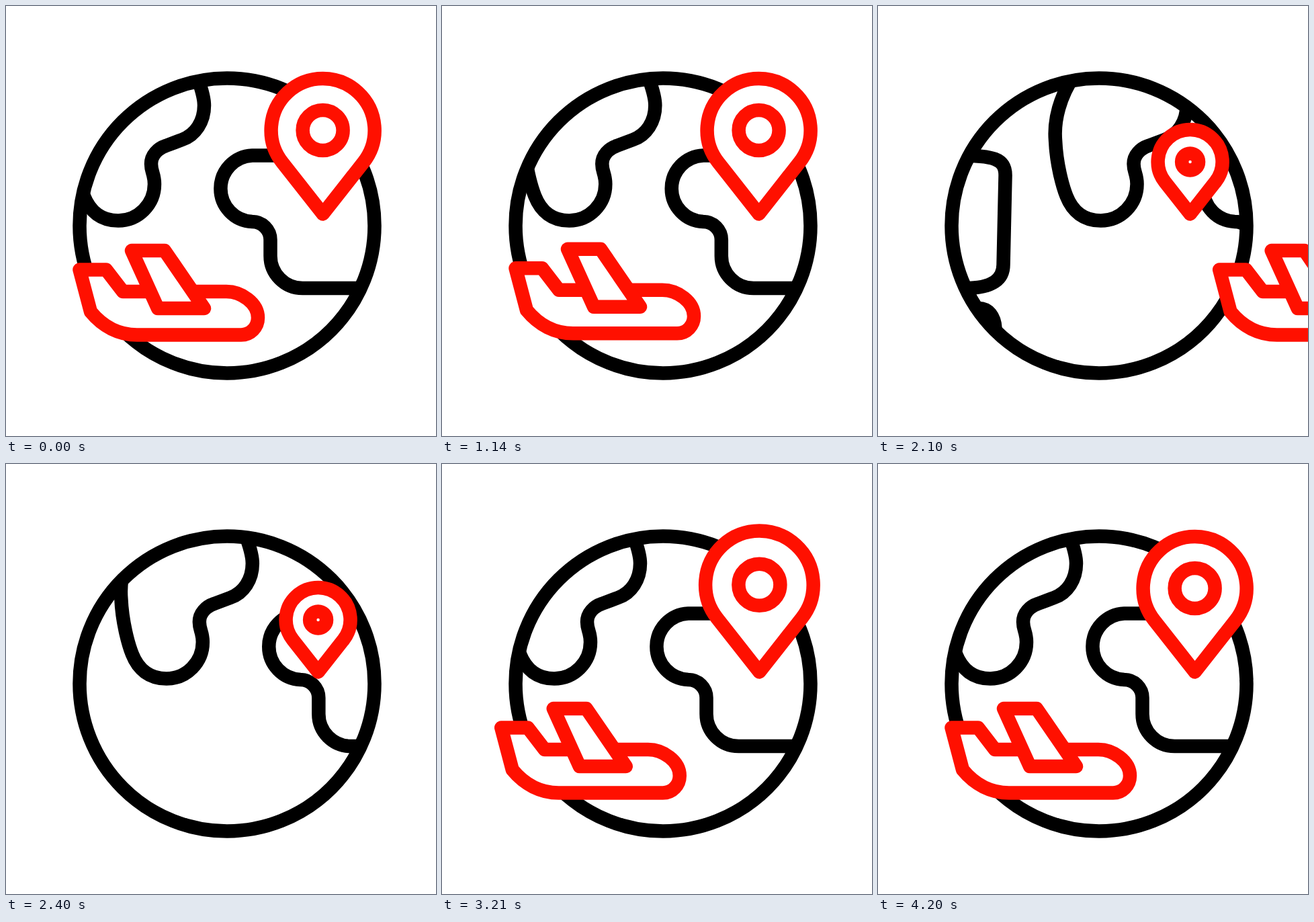
Write an HTML page that moves like this. It is 640 px wide and 640 px high and loops after 4230 ms.

```html
<!DOCTYPE html>
<html lang="en">
<head>
<meta charset="utf-8">
<title>Globe, plane and pin</title>
<style>
  html, body { margin: 0; width: 100%; height: 100%; overflow: hidden; background: #fff; }
  svg { display: block; width: 100vw; height: 100vh; }
  .line { stroke-width: 20.5; stroke-linecap: round; stroke-linejoin: round; }
  .dark { stroke: #000; }
  .red { stroke: #ff1000; }
</style>
</head>
<body>
<svg viewBox="0 0 640 640">
  <defs>
    <clipPath id="disc"><circle cx="329" cy="327" r="222"/></clipPath>
    <g id="land">
      <path d="M128 102C106 135 97 170 99.500 200C101 235 110 268 116 283C125 306 142 319.500 167 319.500C197 319.500 221 295 221 265C221 250 216 247 216 235C216 222 226 212 238 208L262 199C282 192 295 172 295 148C295 135 290 120 284 104Z"/>
      <path d="M560 222.500H366.500A49.300 49.300 0 0 0 366.500 321A27 27 0 0 1 393.500 348V372A48 48 0 0 0 441.500 420H570C612 420 627 406 627 385L630 252C630 227 612 222.500 560 222.500Z"/>
      <path d="M529 487C529 505 537 515 549 515C570 515 587 512 597 510C610 507 615 497 615 480C614 462 605 450 590 450H560C540 450 529 465 529 487Z"/>
    </g>
  </defs>
  <rect width="640" height="640" fill="#fff"/>
  <g class="line dark" fill="none">
    <g clip-path="url(#disc)">
      <use id="landA" href="#land"/>
      <use id="landB" href="#land"/>
    </g>
    <circle cx="329" cy="327" r="219.500"/>
  </g>
  <g id="plane" class="line red" fill="#fff">
    <path d="M109.500 392.500H149L174 425H328C350 425 375 442 375 464C375 478 364 489.500 350 489.500H195C168 489.500 144 477 126 455Z"/>
    <path d="M187 364H236L295 450H226Z"/>
  </g>
  <g class="line red" fill="#fff">
    <path id="pin"/>
    <circle id="eye"/>
  </g>
  <g id="streaks"></g>
</svg>
<script>
const LOOP = 4230, TURN = 605;
const $ = id => document.getElementById(id);
const clamp = v => Math.min(1, Math.max(0, v));

// Cubic easing with end slopes of zero; a and b are the handles' x values.
const ease = (a, b) => x => {
  let lo = 0, hi = 1;
  for (let i = 0; i < 24; i++) {
    const s = (lo + hi) / 2, r = 1 - s;
    if (3 * r * r * s * a + 3 * r * s * s * b + s * s * s < x) lo = s; else hi = s;
  }
  return lo * lo * (3 - 2 * lo);
};
const smooth = x => x * x * (3 - 2 * x);
const spin = ease(0.33, 0.25);
const arrive = ease(0.33, 0.04);

// Keys are [time, value, easing used to reach it].
function track(keys, t) {
  let value = keys[0][1];
  for (let i = 1; i < keys.length; i++) {
    const [t0, v0] = keys[i - 1], [t1, v1, curve = smooth] = keys[i];
    if (t < t0) break;
    value = v0 + (v1 - v0) * curve(clamp((t - t0) / (t1 - t0)));
  }
  return value;
}

const landX = [[650, 0], [1120, 22.5], [3170, -TURN, spin]];
const planeExit = [[1150, 0], [1450, -20.5], [2450, 562]];
const planeEntry = [[2610, -561], [3455, 0, arrive]];
const planeY = [[0, 0], [700, -6], [1450, 0]];
const pinScale = [[1150, 1], [1620, 1.062], [2080, 0.623], [2810, 0.623], [3270, 1.062], [3750, 1]];

const streaks = [
  { x: 77, y: 510.5, length: 52, color: "dark" },
  { x: 254, y: 386.5, length: 38, color: "dark" },
  { x: 322, y: 510.5, length: 22, color: "red" }
].map(s => {
  const node = document.createElementNS("http://www.w3.org/2000/svg", "path");
  node.setAttribute("class", "line " + s.color);
  $("streaks").append(node);
  return { ...s, node };
});

function drawPin(s) {
  const x = 453 + 18.6 * s, tip = 309.5, r = 77 * s, cy = tip - 124.5 * s;
  const dx = 60.5 * s, y = cy + 47.6 * s;
  $("pin").setAttribute("d", `M${x} ${tip}L${x - dx} ${y}A${r} ${r} 0 1 1 ${x + dx} ${y}Z`);
  $("eye").setAttribute("cx", x);
  $("eye").setAttribute("cy", cy);
  $("eye").setAttribute("r", 30 + (s - 1) * (s > 1 ? 24 : 46.5));
}

function drawStreaks(t) {
  const head = smooth(clamp((t - 1650) / 200));
  const tail = smooth(clamp((t - 1700) / 200));
  for (const { x, y, length, node } of streaks) {
    node.setAttribute("d", `M${x - length * tail} ${y}H${x - length * head}`);
    node.style.display = head > tail ? "" : "none";
  }
}

function draw(t) {
  const shift = track(landX, t);
  $("landA").setAttribute("x", shift);
  $("landB").setAttribute("x", shift + TURN);
  const planeX = track(t < 2610 ? planeExit : planeEntry, t);
  $("plane").setAttribute("transform", `translate(${planeX} ${track(planeY, t)})`);
  drawPin(track(pinScale, t));
  drawStreaks(t);
}

const start = performance.now();
function tick() {
  draw((performance.now() - start) % LOOP);
  requestAnimationFrame(tick);
}
tick();
</script>
</body>
</html>
```
